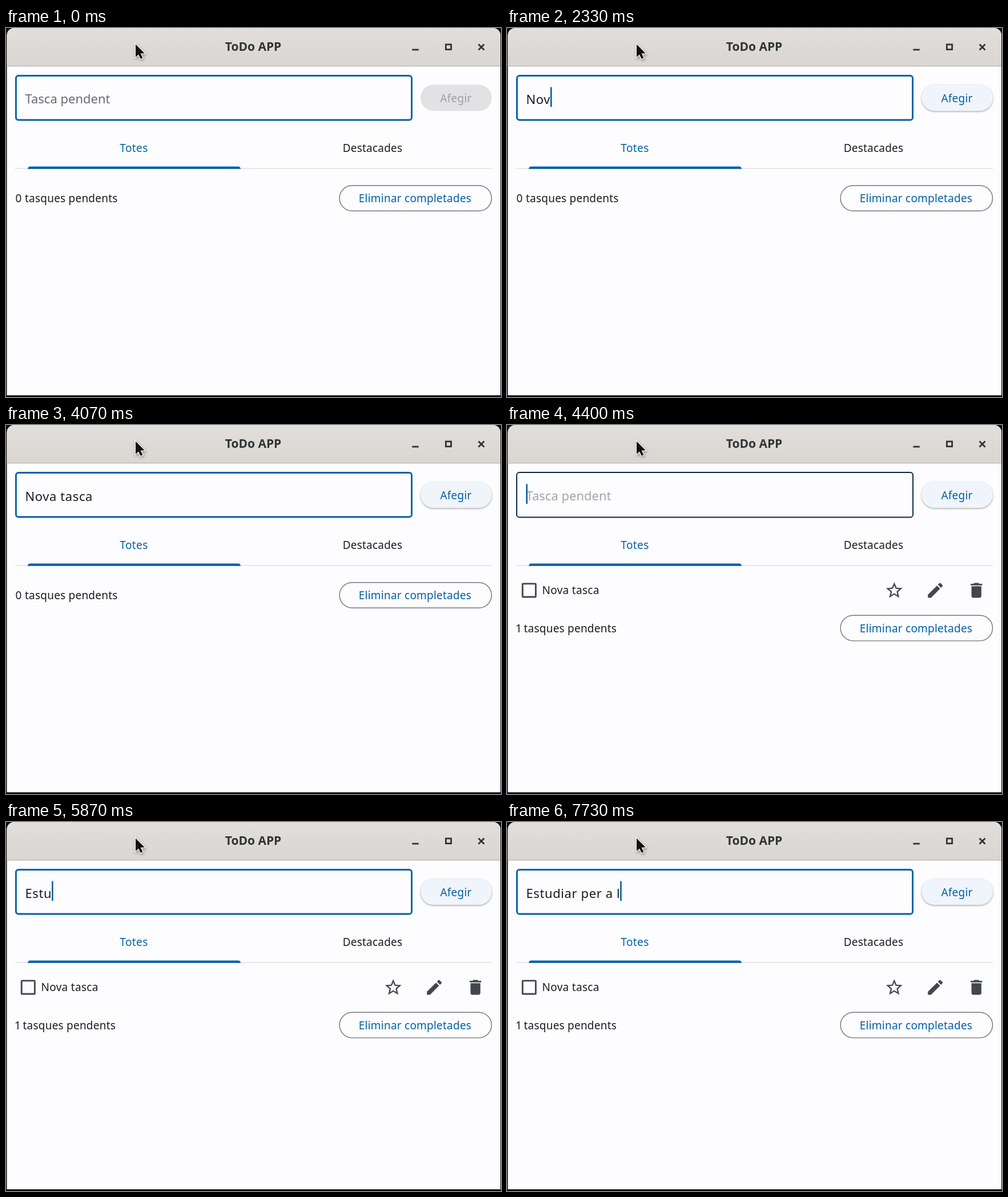
An HTML page with a canvas that plays this animation: 867 by 646 pixels, repeating every 8 s.

```html
<!DOCTYPE html>
<html lang="ca">
<head>
<meta charset="utf-8">
<title>ToDo APP</title>
<style>
  html, body { margin: 0; width: 100%; height: 100%; overflow: hidden; background: #111; }
  canvas { display: block; }
</style>
</head>
<body>
<canvas id="stage" width="867" height="646"></canvas>
<script>
const ctx = document.getElementById('stage').getContext('2d');
const LOOP = 8000;
const SUBMIT = 4400;
const UNIT = 1.44;
const FONT = '"Noto Sans", "Open Sans", sans-serif';
const PRIMARY = '#0061a4', INK = '#1a1c1e', ICON = '#42474e', SURFACE = '#fdfcff';
const OUTLINE = '#73777f', CHROME = '#2e3436';

// [time, value] steps; each value holds until the next one
const TYPED = [
  [0, ''], [270, 'N'], [470, 'NO'], [1200, 'N'], [2000, 'No'], [2330, 'Nov'],
  [2400, 'Nova'], [2530, 'Nova '], [3070, 'Nova t'], [3130, 'Nova ta'],
  [3330, 'Nova tas'], [3470, 'Nova tasc'], [3530, 'Nova tasca'], [SUBMIT, ''],
  [5200, 'E'], [5330, 'Es'], [5670, 'Est'], [5870, 'Estu'], [6130, 'Estud'],
  [6270, 'Estudi'], [6400, 'Estudia'], [6530, 'Estudiar'], [6670, 'Estudiar '],
  [7070, 'Estudiar p'], [7130, 'Estudiar pe'], [7270, 'Estudiar per'],
  [7330, 'Estudiar per '], [7530, 'Estudiar per a'], [7600, 'Estudiar per a '],
  [7730, 'Estudiar per a l']
];
const CARET = [
  [0, 0], [270, 1], [930, 0], [1200, 1], [1730, 0], [2000, 1], [3000, 0],
  [3070, 1], [4070, 0], [SUBMIT, 1], [4870, 0], [5200, 1]
];
const HINT = [
  [0, 0.97], [270, 0.83], [330, 0.4], [470, 0], [SUBMIT, 0.58], [4470, 0.88],
  [4530, 0.97], [5200, 0.83], [5270, 0.4], [5330, 0]
];
const ENABLED = [[0, 0], [470, 0.25], [530, 0.65], [600, 1]];
const FOCUS = [[0, 1], [SUBMIT, 0.35], [4470, 0.8], [4530, 1]];

const STAR = new Path2D('M22 9.24l-7.19-.62L12 2 9.19 8.63 2 9.24l5.46 4.73L5.82 21 12 17.27 18.18 21l-1.63-7.03L22 9.24zM12 15.4l-3.76 2.27 1-4.28-3.32-2.88 4.38-.38L12 6.1l1.71 4.04 4.38.38-3.32 2.88 1 4.28L12 15.4z');
const PENCIL = new Path2D('M3 17.25V21h3.75L17.81 9.94l-3.75-3.75L3 17.25zM20.71 7.04c.39-.39.39-1.02 0-1.41l-2.34-2.34c-.39-.39-1.02-.39-1.41 0l-1.83 1.83 3.75 3.75 1.83-1.83z');
const BIN = new Path2D('M6 19c0 1.1.9 2 2 2h8c1.1 0 2-.9 2-2V7H6v12zM19 4h-3.5l-1-1h-5l-1 1H5v2h14V4z');
const POINTER = new Path2D('M227 28.5V51l5-4.6 3.8 7.6 3.6-1.8-3.7-7.4 7-.6z');

function at(steps, t) {
  let value = steps[0][1];
  for (const [time, next] of steps) if (t >= time) value = next;
  return value;
}

const mix = (a, b, k) => `rgb(${a.map((v, i) => Math.round(v + (b[i] - v) * k))})`;

function text(str, x, y, { size = 19, color = INK, spacing = 0.22, align = 'left', weight = 400 } = {}) {
  ctx.font = `${weight} ${size}px ${FONT}`;
  ctx.letterSpacing = spacing + 'px';
  ctx.textAlign = align;
  ctx.fillStyle = color;
  ctx.fillText(str, x, y);
  return ctx.measureText(str).width;
}

function rect(x, y, w, h, color) {
  ctx.fillStyle = color;
  ctx.fillRect(x, y, w, h);
}

function rounded(x, y, w, h, r, color) {
  ctx.beginPath();
  ctx.roundRect(x, y, w, h, r);
  ctx.fillStyle = color;
  ctx.fill();
}

// Border drawn inside the given box
function frame(x, y, w, h, r, line, color) {
  ctx.beginPath();
  ctx.roundRect(x + line / 2, y + line / 2, w - line, h - line, Math.max(0, r - line / 2));
  ctx.lineWidth = line;
  ctx.strokeStyle = color;
  ctx.stroke();
}

function icon(path, cx, cy) {
  ctx.save();
  ctx.translate(cx - 12 * UNIT, cy - 12 * UNIT);
  ctx.scale(UNIT, UNIT);
  ctx.fillStyle = ICON;
  ctx.fill(path);
  ctx.restore();
}

function drawWindow() {
  rect(0, 0, 867, 646, '#111');
  rounded(1.5, 0, 864.5, 643, [13, 13, 0, 0], SURFACE);

  const bar = ctx.createLinearGradient(0, 0, 0, 67);
  bar.addColorStop(0, '#e1dedb');
  bar.addColorStop(1, '#dad6d2');
  rounded(1.5, 0, 864.5, 67, [13, 13, 0, 0], bar);
  rect(1.5, 66, 864.5, 1.4, '#bfb8b1');
  text('ToDo APP', 433, 40, { size: 21, color: CHROME, spacing: 0, align: 'center', weight: 700 });

  rect(711.3, 36.6, 11.5, 2.8, CHROME);
  frame(769, 27.5, 12, 11.5, 0, 2.8, CHROME);
  ctx.beginPath();
  ctx.moveTo(827.5, 28.5);
  ctx.lineTo(837.5, 38.5);
  ctx.moveTo(837.5, 28.5);
  ctx.lineTo(827.5, 38.5);
  ctx.stroke();
}

function drawPointer() {
  ctx.save();
  ctx.shadowColor = 'rgba(0,0,0,.4)';
  ctx.shadowBlur = 4;
  ctx.shadowOffsetX = 1;
  ctx.shadowOffsetY = 2;
  ctx.lineWidth = 2.4;
  ctx.strokeStyle = '#fff';
  ctx.stroke(POINTER);
  ctx.restore();
  ctx.fillStyle = '#111';
  ctx.fill(POINTER);
}

function drawField(t) {
  const focus = at(FOCUS, t);
  frame(16, 82, 696, 80.5, 5.8, UNIT * (1 + focus), mix([8, 10, 12], [0, 97, 164], focus));
  text('Tasca pendent', 33.5, 132, { size: 22, spacing: 0, color: `rgba(0,0,0,${0.6 * at(HINT, t)})` });
  const width = text(at(TYPED, t), 33.5, 132.5, { size: 22, spacing: 0.6 });
  if (at(CARET, t)) rect(33.4 + width, 103.5, 2.6, 34.5, PRIMARY);
}

function drawAddButton(t) {
  const on = at(ENABLED, t);
  ctx.save();
  ctx.shadowColor = `rgba(0,0,0,${0.35 * on})`;
  ctx.shadowBlur = 3;
  ctx.shadowOffsetY = 1.4;
  rounded(726, 99.2, 125, 46, 23, mix([226, 225, 228], [240, 244, 251], on));
  ctx.restore();
  text('Afegir', 788, 129.5, { align: 'center', color: mix([160, 160, 163], [0, 97, 164], on) });
}

function drawTabs() {
  text('Totes', 224, 217, { align: 'center', color: PRIMARY, spacing: 0.4 });
  text('Destacades', 642, 217, { align: 'center' });
  rect(16, 245.2, 835, 1.44, '#dfe0e4');
  rounded(38, 242.4, 373, 4.3, [4.3, 4.3, 0, 0], PRIMARY);
}

function drawTask() {
  frame(25.8, 276.4, 26, 26, 2.5, 2.88, ICON);
  text('Nova tasca', 61.5, 296, { spacing: 0.3 });
  icon(STAR, 678.3, 289.5);
  icon(PENCIL, 750.2, 289.5);
  icon(BIN, 822.2, 289.5);
}

function drawFooter(count) {
  const y = count * 57.6;
  text(String(count), count ? 15 : 16.5, 305 + y);
  text('tasques pendents', count ? 29.5 : 33, 305 + y);
  frame(583.4, 275 + y, 267.8, 46, 23, UNIT, OUTLINE);
  text('Eliminar completades', 716.5, 305 + y, { align: 'center', color: PRIMARY });
}

function render(now) {
  const t = now % LOOP;
  const count = t >= SUBMIT ? 1 : 0;
  drawWindow();
  drawField(t);
  drawAddButton(t);
  drawTabs();
  if (count) drawTask();
  drawFooter(count);
  drawPointer();
  requestAnimationFrame(render);
}
requestAnimationFrame(render);
</script>
</body>
</html>
```
